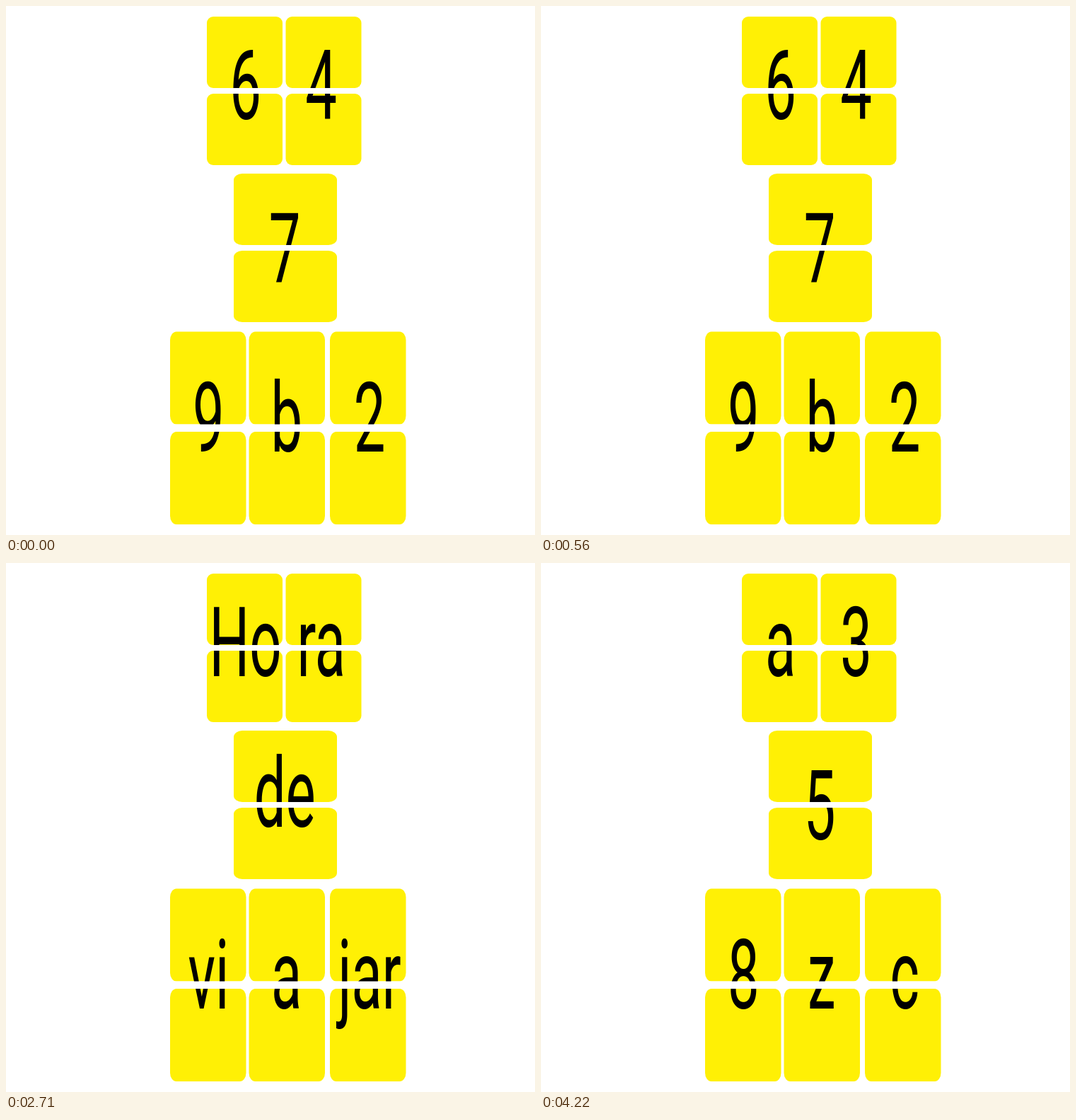
Recreate the animation shown at these times as an HTML page. Size 748x748 px, loop 4350 ms.

```html
<!DOCTYPE html>
<html lang="pt">
<head>
<meta charset="utf-8">
<title>Split-flap board</title>
<style>
  html, body { margin: 0; width: 100%; height: 100%; overflow: hidden; background: #fff; }
  svg { display: block; width: 100vw; height: 100vh; }
  text { font: 400 137.8px Roboto, sans-serif; text-anchor: middle; fill: #000; }
</style>
</head>
<body>
<svg id="board" viewBox="0 0 748 748"></svg>
<script>
const board = document.getElementById('board');
const CONDENSE = 0.577;
const LOOP = 4350;

// Each row: top and bottom flap share a height; `gap` is the slit between them.
const rows = [
  { y: 15, h: 101, gap: 8, w: 107, rx: 9, ry: 9, cards: [284, 395.5] },
  { y: 237, h: 101, gap: 8, w: 146, rx: 12, ry: 9, cards: [322] },
  { y: 460.5, h: 131, gap: 10.5, w: 107.5, rx: 9, ry: 12, cards: [232, 343.5, 458] }
];

// Text centre, baseline, and what the card shows in each state.
const cells = [
  { x: 338.5, y: 160, show: ['6', 'a', 'Ho'] },
  { x: 445.7, y: 160, show: ['4', '3', 'ra'] },
  { x: 394.2, y: 391, show: ['7', '5', 'de'], lift: 18 },
  { x: 286.3, y: 630.3, show: ['9', '8', 'vi'] },
  { x: 396.7, y: 630.3, show: ['b', 'z', 'a'] },
  { x: 514, y: 630.3, show: ['2', 'c', 'jar'] }
];

// [end time in ms, state]
const steps = [[230, 0], [560, 1], [860, 0], [1190, 1], [3720, 2], [4020, 0], [LOOP, 1]];

function add(tag, attrs) {
  const node = document.createElementNS('http://www.w3.org/2000/svg', tag);
  for (const name in attrs) node.setAttribute(name, attrs[name]);
  return board.appendChild(node);
}

for (const { y, h, gap, w, rx, ry, cards } of rows)
  for (const x of cards)
    for (const top of [y, y + h + gap])
      add('rect', { x, y: top, width: w, height: h, rx, ry, fill: '#fff005' });

for (const cell of cells) cell.node = add('text');

for (const { y, h, gap } of rows)
  add('rect', { x: 0, y: y + h, width: 748, height: gap, fill: '#fff' });

let current = -1;

function render(time) {
  const state = steps.find(([end]) => time < end)[1];
  if (state === current) return;
  current = state;
  for (const { node, x, y, show, lift = 0 } of cells) {
    const baseline = state === 2 ? y - lift : y;
    node.setAttribute('transform', `translate(${x} ${baseline}) scale(${CONDENSE} 1)`);
    node.textContent = show[state];
  }
}

function tick() {
  render(performance.now() % LOOP);
  requestAnimationFrame(tick);
}
tick();
</script>
</body>
</html>
```
